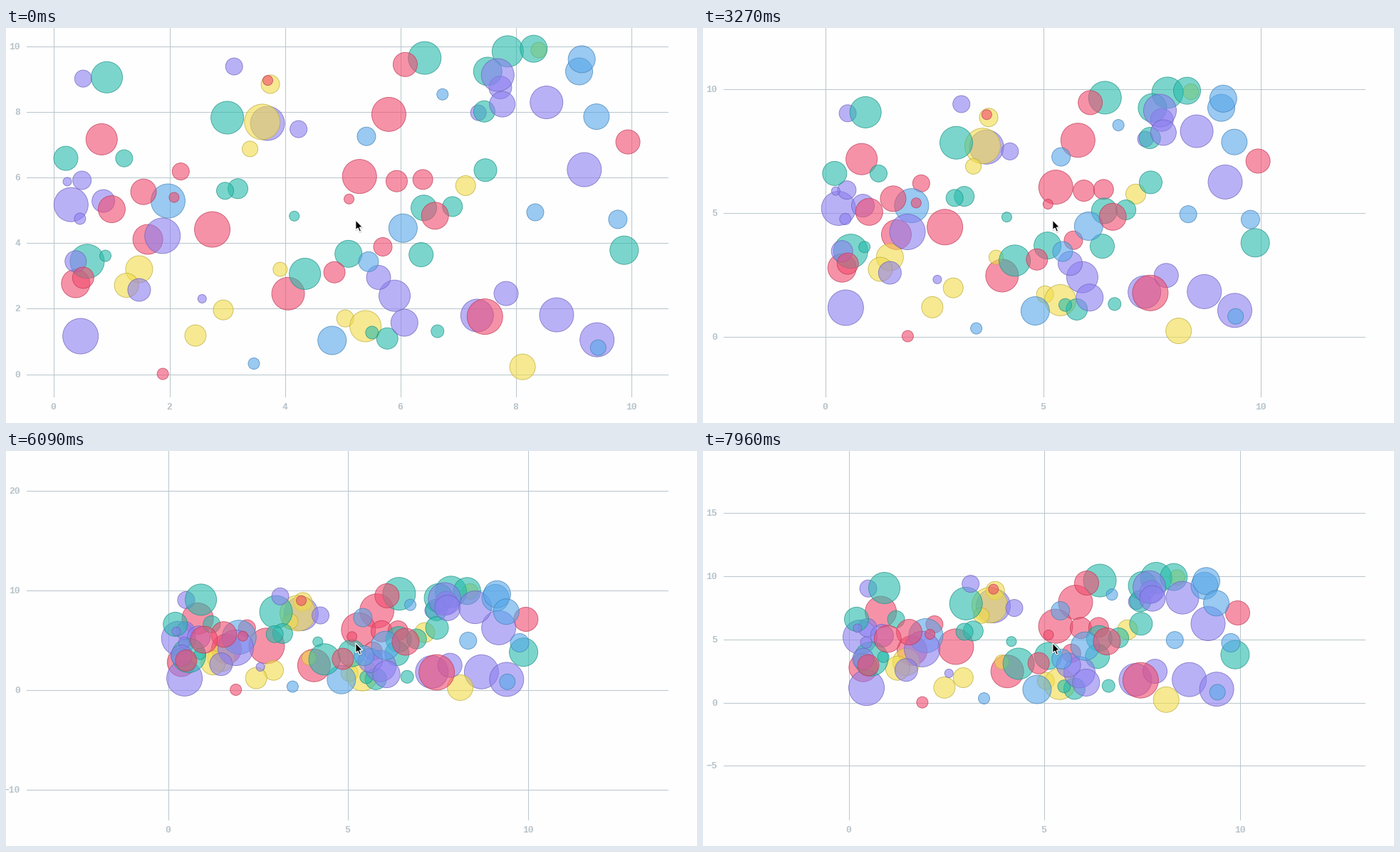
A matplotlib script that plays this animation: 970x555 px, repeating every 8000 ms.

```python
import math

import matplotlib.pyplot as plt
import numpy as np
from matplotlib.animation import FuncAnimation
from matplotlib.patches import Polygon, Rectangle

W, H, DPI = 970, 555, 80
LEFT, RIGHT, BOTTOM = 29, 929, 518
LOOP, TICK = 8000, 20
PT = 72 / DPI

FOCUS = (5.25, 4.69)          # data point under the cursor
FOCUS_PX = (492.5, 269.8)
START = (81.05, 46.1)         # pixels per unit on x and y

# (first change, last change, steps, x scale, y scale)
GESTURES = [
    (1110, 1110, 1, 85, 48.35),
    (1400, 2360, 6, 179.1, 101.9),
    (2560, 2770, 2, 108, 61.5),
    (3040, 3270, 2, 61.05, 34.8),
    (3540, 3660, 2, 69.1, 34.8),
    (4080, 4240, 2, 185.1, 34.8),
    (4520, 4720, 2, 370, 34.8),
    (4990, 5380, 3, 101.17, 34.8),
    (5580, 5580, 1, 50.55, 34.8),
    (5880, 5880, 1, 50.55, 21.7),
    (6000, 6000, 1, 50.55, 14.0),
    (6130, 6250, 2, 50.55, 10.8),
    (6380, 6380, 1, 50.55, 8.4),
    (6500, 6870, 4, 50.55, 6.0),
    (7020, 7020, 1, 50.55, 16.35),
    (7290, 7960, 5, 54.95, 17.77),
]

TEAL, PINK, YELLOW = (38, 187, 172), (242, 75, 110), (242, 220, 73)
PURPLE, BLUE = (140, 127, 240), (87, 167, 233)

# Bubbles as (x, y, radius in pixels), grouped from back to front
pink_back = [
    (.83, 7.15, 22), (5.804, 7.91, 24), (9.945, 7.07, 17), (5.296, 6.017, 24),
    (5.94, 5.875, 15), (6.393, 5.925, 14), (2.2, 6.17, 12), (2.746, 4.403, 25),
    (1.63, 4.1, 21), (.38, 2.755, 20), (4.06, 2.446, 23), (5.7, 3.873, 13),
]
purple_back = [
    (.51, 9, 12), (3.703, 7.635, 24), (7.355, 7.96, 11), (.3, 5.16, 24),
    (.49, 5.9, 13), (.86, 5.27, 16), (.465, 1.15, 25), (7.333, 1.78, 23),
    (8.71, 1.8, 24), (9.41, 1.04, 24), (9.19, 6.225, 24),
]
yellow = [
    (3.752, 8.83, 13), (3.611, 7.68, 25), (3.4, 6.857, 11), (7.134, 5.738, 14),
    (1.48, 3.19, 19), (1.26, 2.7, 17), (3.922, 3.187, 10), (2.936, 1.95, 14),
    (2.455, 1.17, 15), (5.048, 1.69, 12), (5.4, 1.455, 22), (8.12, .215, 18),
    (8.4, 9.87, 11),
]
blue_back = [(1.98, 5.27, 24), (4.821, 1.02, 20)]
teal = [
    (.92, 9.04, 22), (.21, 6.57, 17), (1.22, 6.57, 12), (3.006, 7.81, 23),
    (6.425, 9.63, 23), (7.864, 9.83, 22), (8.313, 9.91, 19), (7.517, 9.22, 20),
    (7.457, 8, 15), (7.477, 6.21, 16), (3.19, 5.645, 14), (2.968, 5.58, 12),
    (4.167, 4.81, 7), (6.41, 5.06, 18), (6.907, 5.1, 14), (5.105, 3.66, 19),
    (6.363, 3.633, 17), (4.351, 3.05, 22), (.58, 3.43, 24), (.895, 3.6, 8),
    (9.88, 3.77, 20), (5.777, 1.08, 15), (5.513, 1.26, 9), (6.647, 1.3, 9),
]
purple_front = [
    (3.124, 9.37, 12), (4.24, 7.46, 12), (7.735, 8.73, 16), (7.69, 9.11, 23),
    (7.77, 8.22, 18), (8.535, 8.275, 23), (.235, 5.86, 6), (.455, 4.73, 8),
    (1.885, 4.21, 25), (.38, 3.43, 15), (1.48, 2.56, 16), (2.57, 2.29, 6),
    (5.904, 2.382, 22), (5.626, 2.94, 17), (6.074, 1.56, 19), (7.835, 2.45, 17),
]
blue_front = [
    (6.734, 8.52, 8), (5.416, 7.24, 13), (9.1, 9.22, 19), (9.145, 9.59, 19),
    (9.4, 7.84, 18), (8.34, 4.925, 12), (9.77, 4.71, 13), (6.05, 4.443, 20),
    (5.453, 3.42, 14), (9.43, .8, 11), (3.467, .315, 8),
]
pink_front = [
    (3.708, 8.945, 7), (6.088, 9.43, 17), (5.115, 5.33, 7), (6.604, 4.82, 19),
    (1.555, 5.55, 18), (2.085, 5.38, 7), (1.005, 5.02, 19), (.51, 2.93, 15),
    (4.862, 3.098, 15), (7.468, 1.745, 25), (1.89, 0, 8),
]
LAYERS = [
    (PINK, pink_back), (PURPLE, purple_back), (YELLOW, yellow),
    (BLUE, blue_back), (TEAL, teal), (PURPLE, purple_front),
    (BLUE, blue_front), (PINK, pink_front),
]


def build_steps():
    """Expand the gestures into (time, x scale, y scale) holds."""
    steps = [(0, *START)]
    for first, last, count, tx, ty in GESTURES:
        _, sx, sy = steps[-1]
        for k in range(count):
            time = first + (last - first) * k / max(count - 1, 1)
            f = (k + 1) / count
            steps.append((time, sx * (tx / sx) ** f, sy * (ty / sy) ** f))
    return steps


STEPS = build_steps()


def scales_at(ms):
    return [s for s in STEPS if s[0] <= ms + TICK / 2][-1][1:]


def nice_step(raw):
    base = 10 ** math.floor(math.log10(raw))
    err = raw / base
    for limit, mult in ((50 ** .5, 10), (10 ** .5, 5), (2 ** .5, 2)):
        if err >= limit:
            return base * mult
    return base


def ticks(axis, scale, lo, hi, spacing):
    """Pixel position and label of every tick between lo and hi."""
    step = nice_step(spacing / scale)
    sign = -1 if axis else 1
    places = 1 if step < 1 else 0
    reach = math.ceil((hi - lo) / scale / step) + 2
    mid = round(FOCUS[axis] / step)
    found = []
    for n in range(mid - reach, mid + reach + 1):
        pos = FOCUS_PX[axis] + sign * (n * step - FOCUS[axis]) * scale
        if lo <= pos <= hi:
            label = f"{n * step:.{places}f}".replace("-", "\u2212")
            found.append((math.floor(pos) + .5, label))
    return found


fig = plt.figure(figsize=(W / DPI, H / DPI), dpi=DPI, facecolor="#fefefe")
ax = fig.add_axes([0, 0, 1, 1])
ax.set(xlim=(0, W), ylim=(H, 0))
ax.axis("off")

FONT = dict(family="Liberation Mono", weight="bold", size=13 * PT,
            color="#b7c3ca", va="baseline")


def make_pool(align):
    return [(ax.plot([], [], color="#b9c6cc", lw=PT, zorder=1)[0],
             ax.text(0, 0, "", ha=align, **FONT)) for _ in range(14)]


x_pool, y_pool = make_pool("center"), make_pool("right")
ax.set(xlim=(0, W), ylim=(H, 0))

points, fills, edges = [], [], []
for rgb, group in LAYERS:
    tone = np.array(rgb) / 255
    points += group
    fills += [(*tone, .6)] * len(group)
    edges += [(*(tone * .78), .75)] * len(group)
points = np.array(points)

bubbles = ax.scatter(points[:, 0], points[:, 1], s=(2 * points[:, 2] * PT) ** 2,
                     c=fills, edgecolors=edges, linewidths=.9 * PT, zorder=2)
bubbles.set_clip_path(Rectangle((LEFT, 0), RIGHT - LEFT, BOTTOM,
                                transform=ax.transData))
ax.set(xlim=(0, W), ylim=(H, 0))

arrow = np.array([(0, 0), (0, 14), (3.2, 11.2), (5.4, 16.4), (7.8, 15.4),
                  (5.6, 10.3), (9.8, 10.1)]) + (490.8, 269.8)
ax.add_patch(Polygon(arrow + (.4, 1), fc=(0, 0, 0, .1), ec=(0, 0, 0, .1),
                     lw=2 * PT, zorder=4))
ax.add_patch(Polygon(arrow, fc="black", ec="white", lw=1.2 * PT, zorder=5))


def fill_pool(pool, marks, vertical):
    for i, (line, text) in enumerate(pool):
        shown = i < len(marks)
        line.set_visible(shown)
        text.set_visible(shown)
        if not shown:
            continue
        pos, label = marks[i]
        text.set_text(label)
        if vertical:
            line.set_data([pos, pos], [0, BOTTOM])
            text.set_position((pos, 536.3))
        else:
            line.set_data([LEFT, RIGHT], [pos, pos])
            text.set_position((20, pos + 4.3))


def update(frame):
    sx, sy = scales_at(frame * TICK)
    fill_pool(x_pool, ticks(0, sx, LEFT, RIGHT, 225), True)
    fill_pool(y_pool, ticks(1, sy, 0, BOTTOM, 120), False)
    px = FOCUS_PX[0] + (points[:, 0] - FOCUS[0]) * sx
    py = FOCUS_PX[1] - (points[:, 1] - FOCUS[1]) * sy
    bubbles.set_offsets(np.column_stack([px, py]))
    return []


anim = FuncAnimation(fig, update, frames=LOOP // TICK, interval=TICK,
                     repeat=True, repeat_delay=0, blit=False)
plt.show()
```
